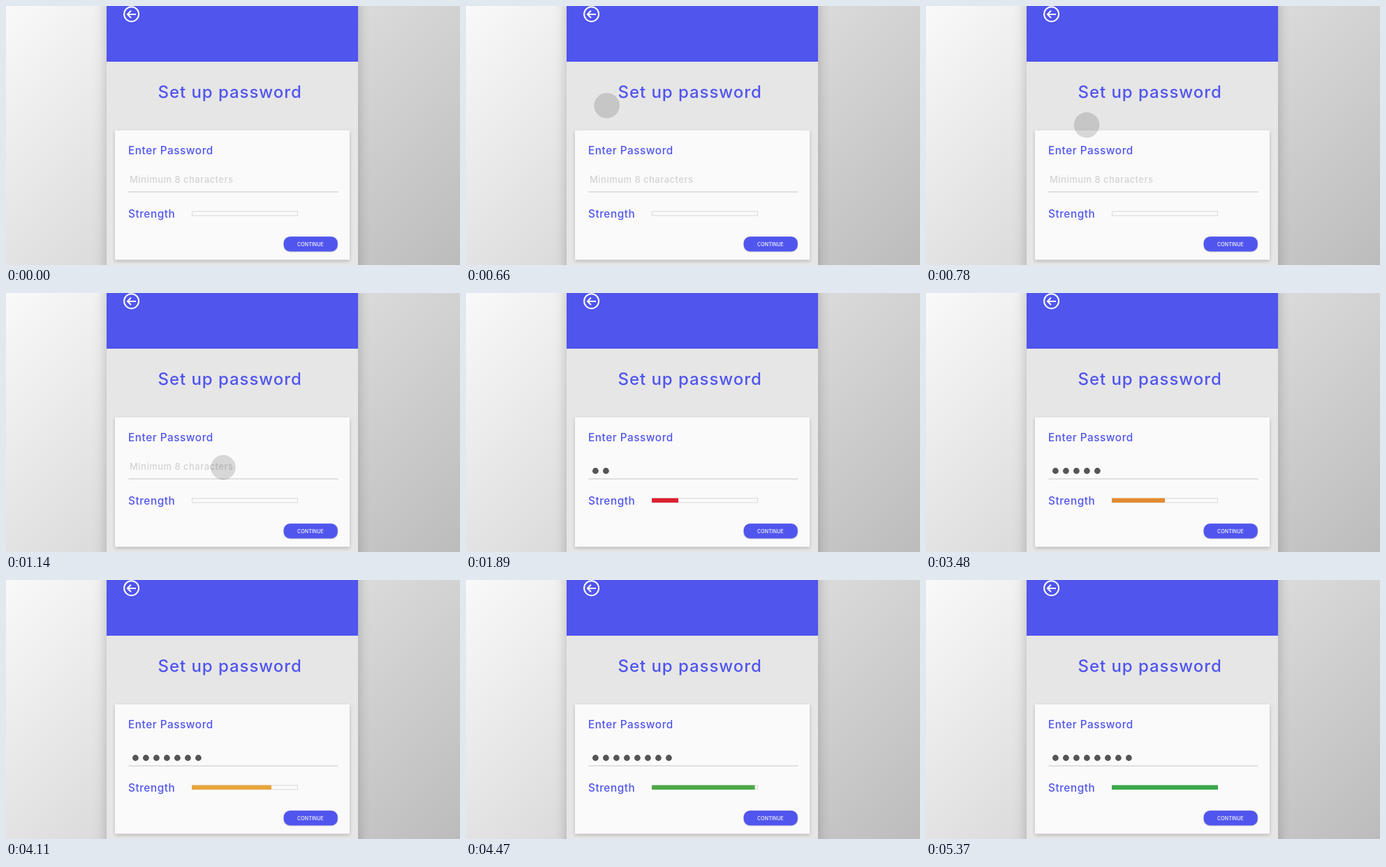
Recreate the animation shown at these times as an HTML page. Size 650x372 px, loop 5430 ms.

```html
<!DOCTYPE html>
<html lang="en">
<head>
<meta charset="utf-8">
<title>Password strength</title>
<style>
html, body { margin: 0; width: 100%; height: 100%; overflow: hidden; }
svg { display: block; width: 650px; height: 372px; }
text { font-family: Inter, "Open Sans", sans-serif; fill: #5055ee; font-weight: 500; }
.title { font-size: 24px; letter-spacing: .95px; }
.label { font-size: 15.3px; letter-spacing: .55px; }
#hint { font-size: 13px; letter-spacing: .48px; fill: #d3d3d3; }
.button { font-size: 7px; letter-spacing: .12px; fill: #fff; }
</style>
</head>
<body>
<svg viewBox="0 0 650 372">
  <defs>
    <linearGradient id="backdrop" gradientUnits="userSpaceOnUse" x1="0" y1="0" x2="511" y2="511">
      <stop stop-color="#f9f9f9"/>
      <stop offset="1" stop-color="#bcbcbc"/>
    </linearGradient>
    <filter id="wide" filterUnits="userSpaceOnUse" x="90" y="-60" width="470" height="500">
      <feGaussianBlur stdDeviation="9"/>
    </filter>
    <filter id="soft" filterUnits="userSpaceOnUse" x="140" y="160" width="370" height="230">
      <feGaussianBlur stdDeviation="2.5"/>
    </filter>
  </defs>
  <rect width="650" height="372" fill="url(#backdrop)"/>
  <rect x="144" y="-40" width="360" height="460" opacity=".22" filter="url(#wide)"/>
  <rect x="144" width="360" height="372" fill="#e6e6e6"/>
  <rect x="144" width="360" height="80" fill="#5055ee"/>
  <g fill="none" stroke="#fff" stroke-width="2">
    <circle cx="179.6" cy="11.7" r="10.5"/>
    <path d="M186 11.9H174M179 6.8L173.9 11.9L179 17"/>
  </g>
  <text class="title" x="217.5" y="132">Set up password</text>

  <rect x="156" y="180.5" width="336" height="186" opacity=".2" filter="url(#soft)"/>
  <rect x="156" y="178.5" width="336" height="186" fill="#fafafa"/>
  <text class="label" x="175" y="212.5">Enter Password</text>
  <text id="hint" x="177" y="253.5">Minimum 8 characters</text>
  <path d="M175.5 267H475.5" stroke="#d6d6d6" stroke-width="1.5"/>
  <g id="dots" fill="#555"></g>
  <text class="label" x="175" y="303.5">Strength</text>
  <rect x="266.5" y="295" width="151" height="6" fill="#fafafa" stroke="#d9d9d9"/>
  <rect id="bar" x="266" y="294.7" height="6.3"/>
  <rect x="397" y="331" width="78.5" height="22.5" rx="9.5" fill="#c9c9d6"/>
  <rect x="397.7" y="331.3" width="77" height="21.2" rx="9" fill="#5055ee"/>
  <text class="button" x="417" y="344.5">CONTINUE</text>
  <circle id="touch" fill="#000" fill-opacity=".14" stroke="#000" stroke-opacity=".06"/>
</svg>
<script>
const LOOP = 5430;
const $ = id => document.getElementById(id);
const mix = (a, b, p) => a + (b - a) * p;
const span = (t, from, to) => Math.min(1, Math.max(0, (t - from) / (to - from)));
const ease = p => p < .5 ? 4 * p ** 3 : 1 - 4 * (1 - p) ** 3;
const smooth = p => p * p * (3 - 2 * p);

const keyTimes = [1560, 1740, 2610, 2850, 3480, 3660, 4110, 4320];
const fills = [[1620, 1890], [2700, 2940], [3540, 3780], [4140, 4560]];
const colors = [[219, 33, 48], [219, 33, 48], [227, 139, 48], [233, 165, 58], [57, 168, 73]];

const dots = keyTimes.map((_, i) => {
  const dot = document.createElementNS('http://www.w3.org/2000/svg', 'circle');
  dot.setAttribute('cx', 185.4 + 15 * i);
  dot.setAttribute('cy', 255.5);
  dot.setAttribute('r', 4.4);
  return $('dots').appendChild(dot);
});

function set(node, attrs) {
  for (const name in attrs) node.setAttribute(name, attrs[name]);
}

function draw(t) {
  const move = ease(span(t, 540, 1120));
  const tap = smooth(span(t, 1110, 1230)) - smooth(span(t, 1230, 1380));
  set($('touch'), {
    cx: mix(197.5, 311, move),
    cy: mix(139, 250.5, move),
    r: 17.9 - 3 * tap,
    opacity: span(t, 30, 420) * (1 - span(t, 1350, 1560))
  });

  $('hint').style.display = t < keyTimes[0] ? '' : 'none';
  dots.forEach((dot, i) => dot.style.display = t < keyTimes[i] ? 'none' : '');

  const level = fills.reduce((sum, [from, to]) => sum + smooth(span(t, from, to)), 0);
  const stage = Math.min(3, Math.floor(level));
  const color = colors[stage].map((c, i) => Math.round(mix(c, colors[stage + 1][i], level - stage)));
  set($('bar'), { width: 38 * level, fill: `rgb(${color})` });
}

const start = performance.now();
function tick() {
  draw((performance.now() - start) % LOOP);
  requestAnimationFrame(tick);
}
tick();
</script>
</body>
</html>
```
